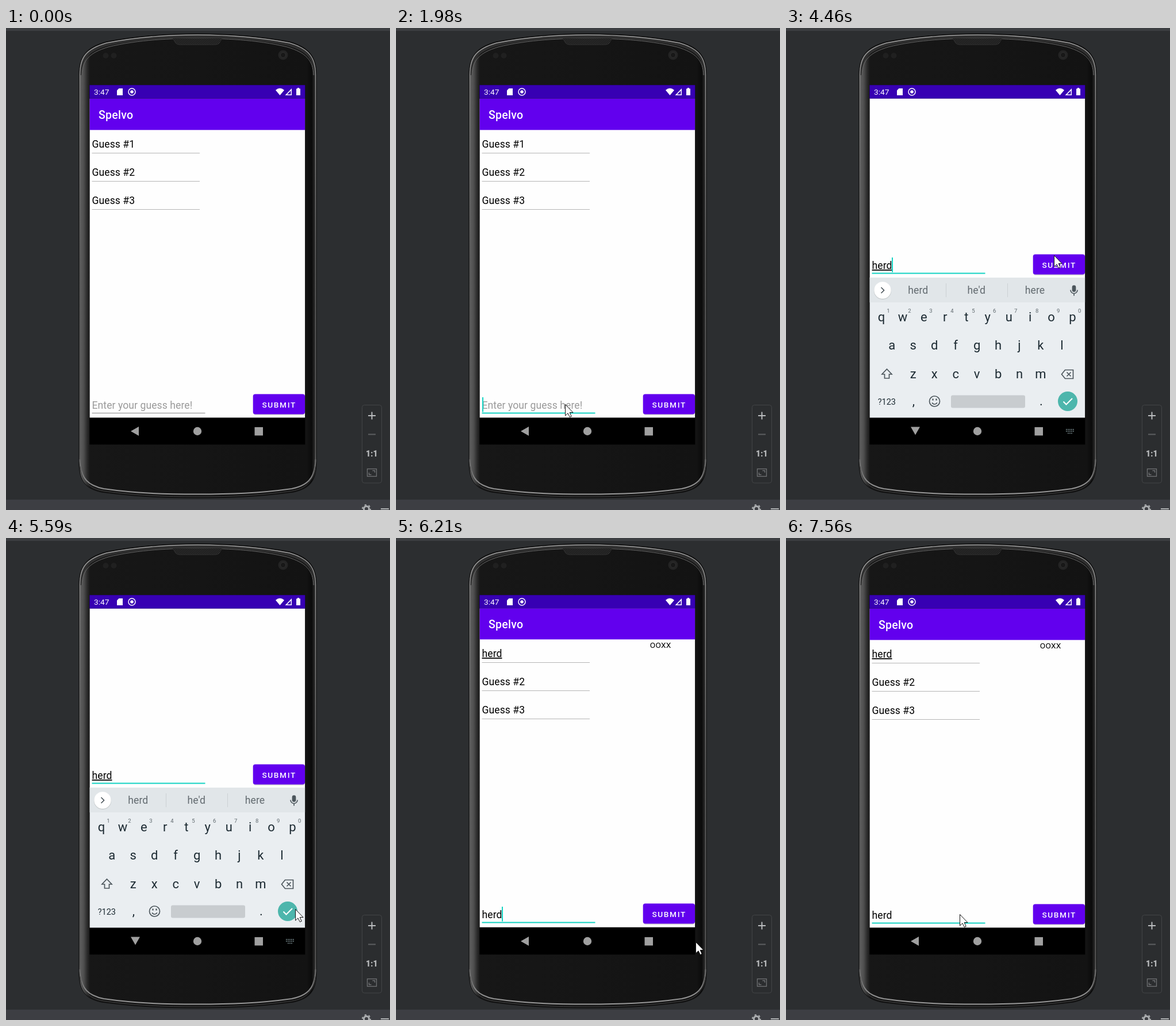
These frames come from a looping animation (668x838 px, 8000 ms). An HTML page:

```html
<!DOCTYPE html>
<html lang="en">
<head>
<meta charset="utf-8">
<title>Word game</title>
<style>
html, body { margin: 0; width: 100%; height: 100%; overflow: hidden; background: #2c2e30; }
svg { display: block; width: 100%; height: 100%; }
text { font-family: Roboto, sans-serif; white-space: pre; }
.field { font-size: 17.57px; letter-spacing: .07px; }
.mid { text-anchor: middle; }
.under { text-decoration: underline; }
.medium { font-weight: 500; }
</style>
</head>
<body>
<svg viewBox="0 0 668 838" xmlns="http://www.w3.org/2000/svg">
  <defs>
    <linearGradient id="body" gradientUnits="userSpaceOnUse" x1="127" x2="540" y1="0" y2="0">
      <stop offset="0" stop-color="#262626"/>
      <stop offset=".008" stop-color="#5c5c5c"/>
      <stop offset=".02" stop-color="#4e4e4e"/>
      <stop offset=".034" stop-color="#2c2c2c"/>
      <stop offset=".046" stop-color="#171717"/>
      <stop offset=".96" stop-color="#131313"/>
      <stop offset=".98" stop-color="#0b0b0b"/>
      <stop offset="1" stop-color="#3a3a3a"/>
    </linearGradient>
    <linearGradient id="rim" gradientUnits="userSpaceOnUse" x1="0" x2="0" y1="10" y2="818">
      <stop offset="0" stop-color="#a8a8a8"/>
      <stop offset=".12" stop-color="#8c8c8c"/>
      <stop offset=".5" stop-color="#626262"/>
      <stop offset=".9" stop-color="#606060"/>
      <stop offset="1" stop-color="#a0a0a0"/>
    </linearGradient>
    <pattern id="mesh" width="3" height="3" patternUnits="userSpaceOnUse">
      <rect width="3" height="3" fill="#181818"/><path d="M0 3L3 0" stroke="#3b3b3b"/>
    </pattern>
    <clipPath id="appClip"><rect x="145.400" y="122.600" width="374.900" height="554.800"/></clipPath>
    <clipPath id="buttonClip"><rect x="429.700" y="636.500" width="90.300" height="35" rx="4"/></clipPath>
  </defs>

  <!-- editor window -->
  <rect width="668" height="838" fill="#2c2e30"/>
  <rect width="668" height="5" fill="#3c3e41"/>
  <rect y="820" width="668" height="18" fill="#3d3e43"/>
  <g fill="none" stroke="#b9bbbd" stroke-width="2">
    <rect x="619.500" y="655.500" width="34" height="135.500" rx="4" fill="#2b2d2f" stroke="#424446" stroke-width="1"/>
    <path d="M630 674H643M636.500 667.500V680.500"/>
    <path d="M630 706.500H643" stroke="#5d5f61"/>
    <g stroke="#707274" stroke-width="1.300">
      <rect x="628.500" y="766.500" width="16" height="13"/>
      <path d="M637.500 769.500H641.500V773M635.500 776.500H631.500V773"/>
    </g>
    <circle cx="627" cy="836" r="4.500" stroke="#adafb1" stroke-width="3"/>
    <circle cx="627" cy="836" r="7" stroke="#adafb1" stroke-dasharray="3.300 4.030"/>
    <path d="M652 836H666" stroke="#adafb1"/>
  </g>
  <text class="mid" x="636.300" y="745" font-size="14" font-weight="900" fill="#b9bbbd">1:1</text>

  <!-- phone -->
  <path d="M127 82C127 50 138 34 174 24C230 13 290 10 333 10C376 10 436 13 494 24C528 34 540 50 540 82V755C540 790 526 801 500 807C440 815 390 817 333 817C276 817 226 815 166 807C140 801 127 790 127 755Z" fill="url(#body)" stroke="#0d0d0d"/>
  <g fill="none" stroke="url(#rim)">
    <path d="M130 82C130 53 142 39 176 29C230 17 290 15 333 15C376 15 436 17 491 29C525 39 537 53 537 82" stroke="#303030" stroke-width="4"/>
    <path d="M128.500 755V82C128.500 51 140 36 175 26C230 15 290 12 333 12C376 12 436 15 493 26C527 36 538.500 51 538.500 82V755" stroke-width="1.400"/>
    <path d="M132 82C133 56 145 43 178 33C230 20 290 18 333 18C376 18 436 20 489 33C522 43 534 56 535 82" stroke="#686868"/>
    <path d="M128.500 750C129 785 145 796 170 801C226 809 276 810.500 333 810.500C390 810.500 440 809 497 801C522 796 538 785 538.500 750" stroke-width="2"/>
    <path d="M129 762C133 791 147 801 170 805C226 813 276 815 333 815C390 815 440 813 497 805C520 801 534 791 538 762" stroke="#454545"/>
  </g>
  <path d="M290 18H376L371 26Q369 29 364 29H302Q297 29 295 26Z" fill="url(#mesh)" stroke="#303030"/>
  <g fill="#202020">
    <circle cx="173.500" cy="48" r="5"/><circle cx="187.500" cy="48" r="5"/>
    <circle cx="482" cy="47" r="8.500" fill="#242424"/><circle cx="482" cy="47" r="4.500" fill="#181818" stroke="#303030"/>
  </g>

  <!-- app -->
  <rect x="145.400" y="99.200" width="374.900" height="625"/>
  <g clip-path="url(#appClip)">
    <g id="app">
      <rect x="145.400" y="122.600" width="374.900" height="555.200" fill="#fefefe"/>
      <rect x="145.400" y="122.600" width="374.900" height="54.700" fill="#6200ee"/>
      <text class="medium" x="161" y="157.700" font-size="19.500" letter-spacing=".25" fill="#fff">Spelvo</text>
      <g id="guesses"></g>
      <text id="score" x="441.700" y="192" font-size="13.670" letter-spacing=".3">OOXX</text>
      <rect id="inputLine" x="149.500" width="197"/>
      <text id="input" class="field" x="149.500" y="662"></text>
      <rect id="caret" y="642" width="2" height="25.500" fill="#14d3c3"/>
      <rect x="430.500" y="638" width="89" height="35" rx="4" opacity=".16"/>
      <rect x="429.700" y="636.500" width="90.300" height="35" rx="4" fill="#6200ee"/>
      <circle id="ripple" cx="466" cy="638" fill="#fff" clip-path="url(#buttonClip)"/>
      <text class="medium" x="445.500" y="659.500" font-size="13.670" letter-spacing="1.600" fill="#fff">SUBMIT</text>
    </g>
    <g id="keyboard">
      <rect x="145.400" y="434" width="374.900" height="244" fill="#eaeef1"/>
      <rect x="145.400" y="434" width="374.900" height="43" fill="#e1e6e9"/>
      <circle cx="168" cy="457" r="15" opacity=".15"/>
      <circle cx="168" cy="456" r="14.700" fill="#fff"/>
      <g id="words" class="field mid" fill="#626a6f"></g>
      <g id="keys" class="mid" fill="#1c2a32" font-size="22"></g>
      <rect x="287" y="638.500" width="129" height="22" rx="3" fill="#c8cccf"/>
      <circle cx="490" cy="649" r="17" fill="#4db6ac"/>
      <g fill="none" stroke="#4c565c" stroke-width="1.700">
        <path d="M165.500 451L170.500 456L165.500 461"/>
        <rect x="498.500" y="448" width="5" height="10" rx="2.500" fill="#4c565c"/>
        <path d="M495 455.500A6 6 0 0 0 507 455.500M501 462V465.500"/>
        <path d="M175.500 593L184 602H179.500V609H171.500V602H167Z"/>
        <path d="M479.500 602L485.500 594.500H499.500V609.500H485.500ZM488.500 598.500L495.500 605.500M495.500 598.500L488.500 605.500"/>
        <circle cx="258.500" cy="649" r="9"/>
        <path d="M254 651.500Q258.500 657 263 651.500"/>
        <path d="M255.500 644.500V647.500M261.500 644.500V647.500" stroke-width="2.300"/>
        <path d="M482.500 649.500L487.500 654.500L498 644" stroke="#fff" stroke-width="2"/>
      </g>
    </g>
  </g>

  <!-- status bar -->
  <rect x="145.400" y="99.200" width="374.900" height="23.400" fill="#3700b3"/>
  <g fill="#fff">
    <text x="153" y="116" font-size="13.670">3:47</text>
    <path d="M196.500 105H203V117H193V108.500Z"/>
    <path d="M469 108Q476.500 101.500 484 108L476.500 117Z"/>
    <path d="M497 105V117H485.500ZM495.500 109L489 115.500H495.500Z" fill-rule="evenodd"/>
    <path d="M507 104H510V105.500H512V117H505V105.500H507Z"/>
    <circle cx="219" cy="111" r="2.800"/>
    <circle cx="219" cy="111" r="6" fill="none" stroke="#fff" stroke-width="1.500"/>
  </g>

  <!-- navigation bar -->
  <g fill="#a0a0a0">
    <path id="back"/>
    <circle cx="333" cy="701" r="7.200"/>
    <rect x="432.500" y="694" width="14.500" height="14.500"/>
    <path id="imeIcon" d="M487 698H502M487 701H502M490 704.500H499" stroke="#83969a" stroke-width="1.600" stroke-dasharray="1.800 1.200"/>
  </g>

  <g id="pointer">
    <g id="click" fill="none">
      <circle cx=".5" cy=".5" r="15" stroke="#000"/><circle cx=".5" cy=".5" r="14" stroke="#fff"/>
    </g>
    <path d="M.5 .5V20L5 15.800L8.300 22.500L11.200 21.200L8.200 14.500H14Z" fill="#fff" stroke="#111" stroke-width="1"/>
  </g>
</svg>
<script>
const $ = id => document.getElementById(id);
const LOOP = 8000, TICK = 66.6, PAN = 243;
const show = (id, on) => $(id).setAttribute('visibility', on ? 'visible' : 'hidden');
const set = (id, attrs) => { for (const k in attrs) $(id).setAttribute(k, attrs[k]); };
const label = (x, y, s, extra = '') => `<text x="${x}" y="${y}" ${extra}>${s}</text>`;

$('guesses').innerHTML = [1, 2, 3].map((n, i) =>
  label(149.5, 208 + i * 49, 'Guess #' + n, `class="field" id="guess${n}"`) +
  `<rect x="149.5" y="${217 + i * 49}" width="187.5" height="1" fill="#b5b5b5"/>`).join('');

const row = (letters, x, y) =>
  [...letters].map((c, i) => label(x + i * 36.95, y, c)).join('');
$('keys').innerHTML =
  row('qwertyuiop', 166, 510) + row('asdfghjkl', 184.3, 559) + row('zxcvbnm', 221.3, 608.5) +
  [...'1234567890'].map((c, i) =>
    label(178 + i * 36.95, 494.5, c, 'font-size="9.5" fill="#5d676c"')).join('') +
  label(175.3, 654.5, '?123', 'font-size="14.5"') + label(222, 656, ',') + label(444, 656, '.');

// Stepped states: the last entry at or before t applies.
const at = (steps, t) => steps.reduce((v, s) => t >= s[0] ? s[1] : v, steps[0][1]);
const pan = [[0, 0], [2110, .55], [2240, 1], [6005, .72], [6075, .34], [6140, .09], [6210, 1 / PAN], [6280, 0]];
const typed = [[0, ''], [2970, 'her'], [3050, 'herd']];
const words = [[0, []], [2970, ['her', 'he', 'here']], [3050, ['herd', "he'd", 'here']]];
const caretX = { '': 150, her: 174, herd: 184 };

// Pointer strokes: time, x, y.
const strokes = [
  [[570, 474, 810], [720, 430, 765], [900, 360, 705], [1120, 305, 660], [1320, 289, 648]],
  [[1840, 294, 654]],
  [[3510, 297, 650], [3700, 340, 580], [3900, 410, 470], [4100, 455, 406], [4242, 466, 395]],
  [[4990, 467, 397], [5190, 490, 470], [5390, 514, 600], [5490, 514, 632], [5589, 503, 645], [5715, 497, 645]],
  [[5870, 497, 645], [6003, 498, 648], [6070, 505, 662], [6203, 521, 702], [6330, 525, 728], [6480, 500, 728], [6600, 452, 722]],
  [[6680, 438, 717], [6900, 380, 688], [7150, 335, 666], [7410, 311, 657], [7490, 305, 655], [7540, 302, 654]]
];
const clicks = [[1450, 1520], [4400, 4460], [5870, 5935]];

function pointerAt(t) {
  const path = strokes.filter(s => s[0][0] <= t).pop();
  if (!path) return null;
  const start = path[0][0];
  const q = start + Math.floor((t - start) / TICK) * TICK;
  const i = path.findIndex(p => p[0] > q);
  if (i < 0) return path[path.length - 1].slice(1);
  const [a, b] = [path[i - 1], path[i]], k = (q - a[0]) / (b[0] - a[0]);
  return [a[1] + (b[1] - a[1]) * k, a[2] + (b[2] - a[2]) * k].map(Math.round);
}

function caretOn(t) {
  if (t < 1980) return false;
  if (t < 3050) return t < 2570 || t >= 2970;
  return Math.floor((t - 3050) / 500) % 2 === 0;
}

function render(t) {
  const p = at(pan, t), text = at(typed, t), focused = t >= 1980;
  const keyboard = t >= 2110 && t < 6210, composing = t < 6005;
  const sent = t >= 4460;

  set('app', { transform: `translate(0 ${-PAN * p})` });
  set('keyboard', { transform: `translate(0 ${PAN * (1 - p)})` });
  show('keyboard', keyboard);
  show('imeIcon', keyboard);
  set('back', { d: keyboard ? 'M217 693.500H233L225 707.500Z' : 'M217 701L231 693V709Z' });

  $('input').textContent = text || 'Enter your guess here!';
  set('input', { fill: text ? '#000' : '#9a9a9a', class: text && composing ? 'field under' : 'field' });
  set('inputLine', focused ? { y: 668.5, height: 2, fill: '#14d3c3' } : { y: 669, height: 1, fill: '#858585' });
  set('caret', { x: caretX[text] });
  show('caret', caretOn(t));

  $('guess1').textContent = sent ? 'herd' : 'Guess #1';
  set('guess1', { class: sent ? 'field under' : 'field' });
  show('score', sent);

  const list = at(words, t);
  $('words').innerHTML = list.map((w, i) => label([229.8, 331.3, 433][i], 462.3, w)).join('') +
    (list.length ? '<path d="M278.500 444V468M385.500 444V468" stroke="#cbd0d3"/>' : '');

  const k = (t - 4530) / 260, rippling = k >= 0 && k < 1;
  show('ripple', rippling);
  if (rippling) set('ripple', { r: 25 + 70 * k, opacity: .22 * (1 - k) });

  const pos = pointerAt(t);
  show('pointer', pos);
  if (pos) set('pointer', { transform: `translate(${pos})` });
  show('click', pos && clicks.some(([a, b]) => t >= a && t < b));
  if (!clicks.some(([a, b]) => t >= a && t < b)) show('click', false);
}

const began = performance.now();
function frame() {
  render((performance.now() - began) % LOOP);
  requestAnimationFrame(frame);
}
frame();
</script>
</body>
</html>
```
